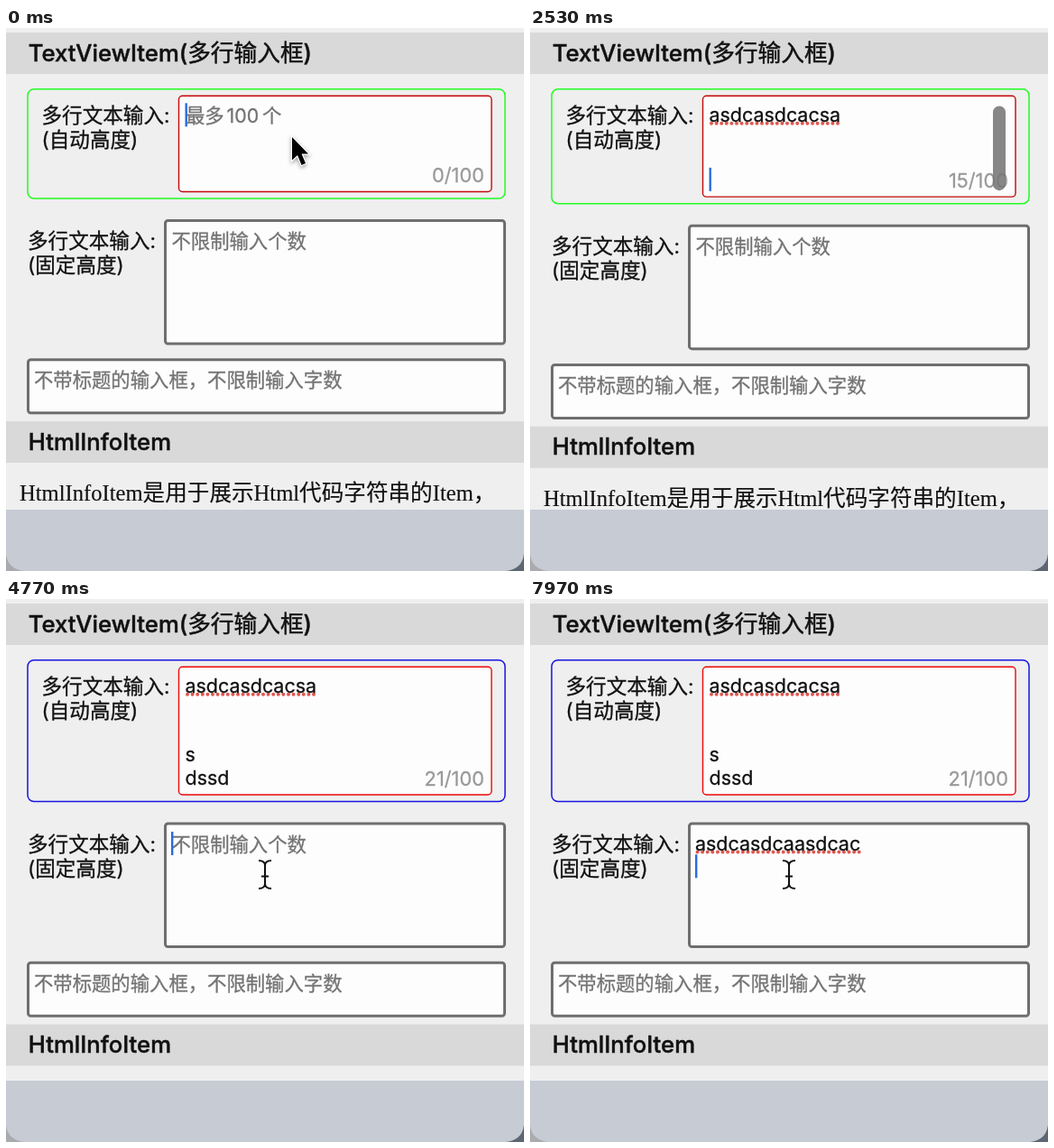
Animation, 574 px wide and 602 px high, one loop 8 s. Source, as an HTML page:

```html
<!DOCTYPE html>
<html lang="zh-CN">
<head>
<meta charset="utf-8">
<style>
  html, body { margin: 0; width: 100%; height: 100%; overflow: hidden; background: #efefef; }
  svg { display: block; width: 574px; height: 602px; font-family: Inter, "Noto Sans CJK SC", "Noto Sans CJK", sans-serif; }
  text { fill: var(--ink); stroke: var(--ink); stroke-width: .3px; --ink: #111; }
  .band { fill: #d9d9d9; }
  .title { font-size: 25.7px; font-weight: 500; stroke-width: .45px; }
  .label { font-size: 22.6px; }
  .hint text, .hint { font-size: 21.35px; --ink: #737373; }
  .input { font-size: 21.45px; }
  .count { font-size: 21.8px; --ink: #999; text-anchor: end; }
  .html { font: 24.6px "Liberation Serif", "Noto Sans CJK SC", "Noto Sans CJK", serif; stroke-width: .15px; }
  .frame { fill: #fdfdfd; stroke: #6e6e6e; stroke-width: 3; }
  .dots { stroke: #e2574f; stroke-width: 4; stroke-linecap: round; stroke-dasharray: 0 5.6; }
  .under { stroke: #1c63d6; stroke-width: 2.6; }
  #panel { fill: #fdfdfd; stroke: #c9c9c9; stroke-width: 1; filter: drop-shadow(0 4px 8px rgba(0, 0, 0, .32)); }
  #words text { font-size: 32px; stroke-width: .5px; --ink: #222; }
  #words .digit { --ink: #8e8e8e; }
  #words .first { --ink: #fb4f14; }
  .cloud { fill: none; stroke: #444; stroke-width: 2.2; stroke-linecap: round; }
  .cloud.pale { stroke: #d0d0d0; }
  #arrow { filter: drop-shadow(0 2px 2px rgba(0, 0, 0, .35)); }
</style>
</head>
<body>
<svg viewBox="0 0 574 602">
  <defs>
    <g id="cloud">
      <path d="M8 21a6 6 0 0 1-1-12a9.5 9.5 0 0 1 18-1a6.6 6.6 0 0 1 1 13h-9a5.5 5.5 0 1 1 5-7a3 3 0 1 1-5-1"/>
    </g>
    <path id="beam" d="M-7-15.5Q0-15.5 0-10Q0-15.5 7-15.5M0-11V11M-7 15.5Q0 15.5 0 10Q0 15.5 7 15.5M-4 2H4"/>
  </defs>
  <rect width="574" height="602" fill="#efefef"/>
  <rect class="band" y="5" width="574" height="46"/>
  <text class="title" x="24.7" y="37">TextViewItem(多行输入框)</text>

  <rect id="outer" x="24" y="67.7" width="529" rx="7" fill="none" stroke-width="1.5"/>
  <rect id="inner" x="191.5" y="75.2" width="346.5" rx="4" fill="#fdfdfd" stroke-width="1.4"/>
  <text class="label" x="39.5" y="105">多行文本输入:</text>
  <text class="label" x="39.5" y="132">(自动高度)</text>
  <g id="hintA" class="hint">
    <text x="199" y="105">最多</text><text x="244.5" y="105">100</text><text x="284" y="105">个</text>
  </g>
  <text id="count" class="count" x="530"></text>
  <rect id="scroller" x="513" y="86.5" width="14" rx="7" fill="#777"/>

  <g id="lower">
    <text class="label" x="24" y="244">多行文本输入:</text>
    <text class="label" x="24" y="271">(固定高度)</text>
    <rect class="frame" x="176.5" y="213.5" width="376" height="136.5" rx="3"/>
    <text id="hintB" class="hint" x="183.5" y="244">不限制输入个数</text>
    <rect class="frame" x="24.5" y="367.8" width="528" height="59" rx="3"/>
    <text class="hint" x="31" y="398">不带标题的输入框，不限制输入字数</text>
    <rect class="band" y="436" width="574" height="46"/>
    <text class="title" x="24.7" y="467.5">HtmlInfoItem</text>
    <text class="html" x="15" y="524">HtmlInfoItem是用于展示Html代码字符串的Item，</text>
  </g>
  <rect y="534" width="574" height="68" fill="#c7cbd4"/>
  <path d="M0 583Q2 600 20 602H0Z" fill="#a9abae"/>
  <path d="M574 583Q572 600 554 602H574Z" fill="#5d6672"/>

  <g id="fields"></g>
  <rect id="caret" width="2.4" height="26" fill="#2b6be0"/>
  <g id="popup">
    <rect id="panel" width="640" height="61" rx="13"/>
    <g id="words"></g>
  </g>
  <path id="arrow" d="M0 0V25.5L6 20L10.5 31L15 29L10.5 18.5H18Z" stroke="#fff" stroke-width="2.4" paint-order="stroke"/>
  <g id="ibeam" fill="none">
    <use href="#beam" stroke="#fff" stroke-width="4.5"/>
    <use href="#beam" stroke="#111" stroke-width="2"/>
  </g>
</svg>
<script>
const LOOP = 8000, PITCH = 25.3, FOCUS_B = 4500;
const $ = id => document.getElementById(id);
const set = (el, attrs) => { for (const k in attrs) el.setAttribute(k, attrs[k]); };
const show = (el, on) => { el.style.display = on ? '' : 'none'; };
const clamp = v => Math.min(1, Math.max(0, v));
const ease = v => (v = clamp(v), v * v * (3 - 2 * v));
const ramp = (t, from, length) => ease((t - from) / length);

// field, text, first key, time per key, commit time
const bursts = [
  ['A', 'asdcasdcacsa', 250, 130, 1740],
  ['A', '\n', 1950, 1, 1950], ['A', '\n', 2180, 1, 2180], ['A', '\n', 2415, 1, 2415],
  ['A', 's', 2750, 110, 2980], ['A', '\n', 3100, 1, 3100],
  ['A', 'dssd', 3280, 110, 3750],
  ['B', 'asdcasdcaasdca', 4880, 105, 6265],
  ['B', 'c', 6420, 110, 6950], ['B', '\n', 7350, 1, 7350],
];

const fields = { A: makeField(198.5, 104.3, 5), B: makeField(183, 243.5, 2) };

function makeField(x, y, count) {
  const add = (tag, cls) => {
    const el = document.createElementNS('http://www.w3.org/2000/svg', tag);
    el.setAttribute('class', cls);
    return $('fields').appendChild(el);
  };
  const lines = Array.from({ length: count }, () => ({ dots: add('line', 'dots'), text: add('text', 'input') }));
  return { x, y, lines, under: add('line', 'under') };
}

const syllables = text => text.match(/[sdc]a|./g) || [];

function typed(name, t) {
  let done = '', letters = '';
  for (const [field, text, start, step, commit] of bursts) {
    if (field !== name) continue;
    if (t >= commit) done += text;
    else if (t >= start) letters = text.slice(0, 1 + Math.floor((t - start) / step));
  }
  return { done, letters, composing: syllables(letters).join("'") };
}

// Lays out one field; returns the caret and composition positions.
function drawField(field, state, offset) {
  const rows = (state.done + state.composing).split('\n');
  const row = rows.length - 1;
  const base = i => field.y + offset + PITCH * i;
  field.lines.forEach(({ text, dots }, i) => {
    const value = rows[i] || '';
    if (text.textContent !== value) text.textContent = value;
    set(text, { x: field.x, y: base(i) });
    const misspelt = i < row && value.length > 1;
    show(dots, misspelt);
    if (misspelt) set(dots, { x1: field.x + 2.5, x2: field.x + text.getComputedTextLength() - 1, y1: base(i) + 1.5, y2: base(i) + 1.5 });
  });
  const text = field.lines[row].text;
  const fixed = rows[row].length - state.composing.length;
  const start = field.x + (fixed > 0 ? text.getSubStringLength(0, fixed) : 0);
  const end = field.x + (rows[row] ? text.getComputedTextLength() : 0);
  show(field.under, state.composing);
  set(field.under, { x1: start, x2: end, y1: base(row) + 3, y2: base(row) + 3 });
  return { start, end, row, y: base(row) };
}

function candidates(letters) {
  const single = { a: '啊阿吖', s: '是上说', d: '的大都', c: '测才从' };
  if (letters.length === 1) return [...single[letters]];
  const n = syllables(letters).length;
  if (letters[0] === 'd') return ['当时是的'.slice(0, n), '等', '都是'];
  const phrase = n === 5 ? '阿萨德擦拭' : '阿萨德擦上档次擦测萨德'.slice(0, n);
  return [phrase, n > 3 ? '' : '阿斯', '阿达'];
}

// An empty candidate is a pending cloud lookup whose icon trails earlier slots.
function clouds(x, letters) {
  const icons = letters.length < 8 ? [[11, 'pale'], [-31, ''], [0, '']] : [[0, 'pale'], [-65, '']];
  return icons.map(([dx, tone]) => `<use href="#cloud" class="cloud ${tone}" x="${x + 4 + dx}" y="18.5"/>`).join('');
}

let shownLetters = '';
function drawPopup(letters, spot) {
  show($('popup'), letters);
  if (!letters) return;
  set($('popup'), { transform: `translate(${spot.start - 33.5} ${spot.y + 25})` });
  if (letters === shownLetters) return;
  shownLetters = letters;
  let x = 18;
  $('words').innerHTML = candidates(letters).map((word, i) => {
    const wordX = x + (i ? 25 : 20);
    const tone = i ? '' : 'first';
    const digit = `<text class="digit ${tone}" x="${x}" y="46.5">${i + 1}</text>`;
    const body = word ? `<text class="${tone}" x="${wordX}" y="46">${word}</text>` : clouds(wordX, letters);
    x = wordX + (word ? 32 * word.length : 58) + 28;
    return digit + body;
  }).join('');
}

function drawMouse(t) {
  show($('arrow'), t < 250);
  set($('arrow'), { transform: 'translate(317 121)' });
  show($('ibeam'), (t > 3800 && t < 4880) || t > 7500);
  const p = ramp(t, 4000, 400);
  set($('ibeam'), { transform: `translate(${304 - 17 * p} ${222 + 83.5 * p})` });
}

function draw(t) {
  const grow4 = ramp(t, 2415, 213), grow5 = ramp(t, 3100, 250);
  const shift = 10 * grow4 + 25.5 * grow5;
  const a = typed('A', t), b = typed('B', t);
  const inB = t >= FOCUS_B;

  set($('outer'), { height: 121.3 + shift, stroke: inB ? '#1515e0' : '#22fb22' });
  set($('inner'), { height: 106.3 + shift, stroke: shift > 20 ? '#ea0808' : '#c40808' });
  set($('lower'), { transform: `translate(0 ${shift})` });
  set($('count'), { y: 171 + shift });
  $('count').textContent = (a.done + a.composing).length + '/100';
  show($('hintA'), !(a.done + a.composing));
  show($('hintB'), !(b.done + b.composing));

  const bar = ramp(t, 2400, 60) * (1 - ramp(t, 2800, 250)) + ramp(t, 3090, 60) * (1 - ramp(t, 3450, 250));
  set($('scroller'), { height: 88 + shift, opacity: .88 * bar });

  const spotA = drawField(fields.A, a, 0), spotB = drawField(fields.B, b, shift);
  const spot = inB ? spotB : spotA;
  const lag = inB ? 0 : spotA.row === 3 ? 10 * (grow4 - 1) : spotA.row === 4 ? 25.5 * (grow5 - 1) : 0;
  set($('caret'), { x: spot.end, y: spot.y - 21 + lag });
  drawPopup(inB ? b.letters : a.letters, spot);
  drawMouse(t);
}

function tick(now) {
  draw(now % LOOP);
  requestAnimationFrame(tick);
}
draw(0);
requestAnimationFrame(tick);
</script>
</body>
</html>
```
